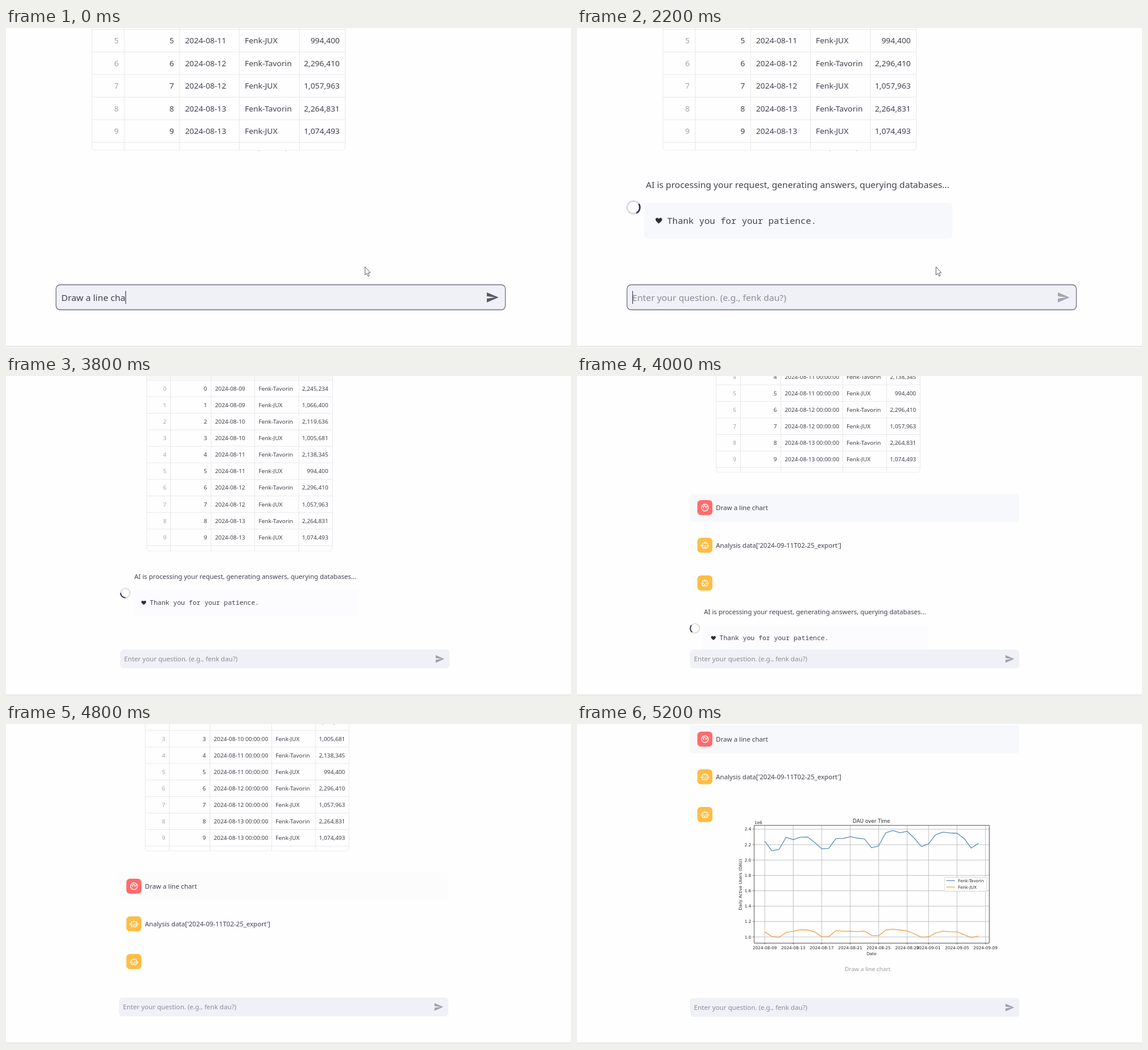
These frames come from a looping animation (960x544 px, 5600 ms). An HTML page with a canvas:

```html
<!DOCTYPE html>
<html lang="en">
<head>
<meta charset="utf-8">
<title>Chat to line chart</title>
<style>
html, body { margin: 0; width: 100%; height: 100%; overflow: hidden; background: #fefefe; }
canvas { display: block; width: 100vw; height: 100vh; }
</style>
</head>
<body>
<canvas id="stage" width="960" height="544"></canvas>
<script>
const ctx = document.getElementById('stage').getContext('2d');
const LOOP = 5600;
const SANS = '"Noto Sans", sans-serif';
const MONO = '"Noto Sans Mono", monospace';
const PLOT = '"DejaVu Sans", sans-serif';
const PAGE = '#fefefe', INK = '#41434e', MUTED = '#8b8d98', GRID = '#e9e9ec';
const BRANDS = ['Fenk-Tavorin', 'Fenk-JUX'];
const PROMPT = 'Draw a line chart';
const HINT = 'Enter your question. (e.g., fenk dau?)';
const VALUES = ['2,245,234', '1,066,400', '2,119,636', '1,005,681', '2,138,345', '994,400',
  '2,296,410', '1,057,963', '2,264,831', '1,074,493', '2,297,118'];
// Daily users in millions
const UPPER = [2.245, 2.12, 2.138, 2.296, 2.265, 2.297, 2.3, 2.23, 2.147, 2.152, 2.28, 2.28, 2.303,
  2.285, 2.275, 2.16, 2.185, 2.355, 2.383, 2.355, 2.373, 2.285, 2.175, 2.21, 2.33, 2.363, 2.352,
  2.348, 2.28, 2.155, 2.217];
const LOWER = [1.066, 1.006, 0.996, 1.058, 1.074, 1.092, 1.09, 1.065, 1.003, 1.003, 1.083, 1.073,
  1.075, 1.07, 1.077, 1.02, 1.017, 1.09, 1.101, 1.09, 1.077, 1.04, 0.995, 1, 1.053, 1.076, 1.068,
  1.066, 1.03, 0.992, 1.01];
const SEND = new Path2D('M2 21L23 12 2 3V10L17 12 2 14z');
const HEART = new Path2D('M0 5C-3 2.5 -5.6 .6 -5.6 -1.9C-5.6 -5 -1.6 -5.8 0 -3C1.6 -5.8 5.6 -5 5.6 -1.9C5.6 .6 3 2.5 0 5z');
const POINTER = new Path2D('M610 406V420L613 417.2 615.3 422 617.3 421 615.2 416.4 619 416z');

// y is the middle of the capitals
function text(str, x, y, size, color = INK, align = 'left', family = SANS) {
  ctx.font = `${size}px ${family}`;
  ctx.fillStyle = color;
  ctx.textAlign = align;
  ctx.fillText(str, x, y + size * 0.36);
}

function line(x1, y1, x2, y2, color, width = 1) {
  ctx.strokeStyle = color;
  ctx.lineWidth = width;
  ctx.beginPath();
  ctx.moveTo(x1, y1);
  ctx.lineTo(x2, y2);
  ctx.stroke();
}

function box(x, y, w, h, r, fill, stroke, width = 1) {
  ctx.beginPath();
  ctx.roundRect(x, y, w, h, r);
  if (fill) { ctx.fillStyle = fill; ctx.fill(); }
  if (stroke) { ctx.strokeStyle = stroke; ctx.lineWidth = width; ctx.stroke(); }
}

function shape(path, x, y, scale, color) {
  ctx.save();
  ctx.translate(x, y);
  ctx.scale(scale, scale);
  ctx.fillStyle = color;
  ctx.fill(path);
  ctx.restore();
}

function ring(x, y, r, from, to, color, width) {
  ctx.strokeStyle = color;
  ctx.lineWidth = width;
  ctx.beginPath();
  ctx.arc(x, y, r, from, to);
  ctx.stroke();
}

function dot(x, y, r, color) {
  ctx.fillStyle = color;
  ctx.beginPath();
  ctx.arc(x, y, r, 0, 7);
  ctx.fill();
}

function send(x, y, scale, color) {
  shape(SEND, x - 12.5 * scale, y - 12 * scale, scale, color);
}

function table({ cols, first, step, bottom, size, pad, clock = '' }) {
  const [left, , , , , right] = cols;
  const top = first - step / 2;
  ctx.save();
  ctx.beginPath();
  ctx.rect(left - 1, -600, right - left + 2, bottom + 600);
  ctx.clip();
  box(left, top - step, right - left, step, 0, '#f9f9fb');
  box(left, top - step, right - left, bottom - top + step - 0.5, [0, 0, 6, 6], null, GRID);
  cols.slice(1, 5).forEach(x => line(x, top - step, x, bottom, GRID));
  VALUES.forEach((value, i) => {
    const y = first + i * step;
    const day = 9 + (i >> 1);
    line(left, y - step / 2, right, y - step / 2, GRID);
    text(i, cols[1] - pad, y, size, '#a3a4ac', 'right');
    text(i, cols[2] - pad, y, size, INK, 'right');
    text(`2024-08-${String(day).padStart(2, '0')}${clock}`, cols[2] + pad - 0.3, y, size);
    text(BRANDS[i % 2], cols[3] + pad - 0.3, y, size);
    text(value, right - pad, y, size, INK, 'right');
  });
  ctx.restore();
}

function spinner(x, y, r, degrees) {
  const mid = degrees * Math.PI / 180;
  const width = r * 0.24;
  ring(x, y, r, 0, Math.PI * 2, '#d9d9dd', width);
  ring(x, y, r, mid - 0.85, mid + 0.85, '#35365a', width);
}

// x, y: start of the first text line
function waiting(x, y, scale, fill, degrees) {
  box(x - 3 * scale, y + 30 * scale, 524 * scale, 61 * scale, 7 * scale, fill);
  text('AI is processing your request, generating answers, querying databases...', x, y, 15.15 * scale);
  shape(HEART, x + 22 * scale, y + 60.5 * scale, scale, '#2c2d36');
  text('Thank you for your patience.', x + 36 * scale, y + 60.5 * scale, 15.12 * scale, INK, 'left', MONO);
  spinner(x - 21 * scale, y + 38 * scale, 10.8 * scale, degrees);
}

function smallInput(x, y) {
  ctx.fillStyle = PAGE;
  ctx.fillRect(0, y, 960, 544 - y);
  box(x, y, 559.5, 32, 6, '#f0f1f6');
  text(HINT, x + 6.8, y + 16.3, 11.2, MUTED);
  send(x + 543.5, y + 16, 0.71, '#a0a2ab');
}

function bottomLine(y) {
  line(0, y, 960, y, '#e4e4e6', 2);
}

function typingScene(t) {
  table({ cols: [146, 201, 295, 396.5, 498.5, 576.5], first: -170.5, step: 38.4, bottom: 208.5, size: 13.4, pad: 9.5 });
  if (t >= 2200) waiting(117, 267, 1, '#f7f8fb', 15);
  box(85, 436.5, 763.5, 42.5, 7, '#f0f0f7', '#737482', 1.3);
  const typed = t < 200 ? PROMPT.slice(0, -2) : t < 1800 ? PROMPT : '';
  text(typed || HINT, 94, 458.5, 15.2, typed ? INK : MUTED);
  const caretOn = t < 1000 || (t >= 1400 && t < 1800) || t >= 2200;
  if (caretOn) {
    const x = 94.5 + ctx.measureText(typed).width;
    line(x, 447, x, 469, '#3c3d48', 1.1);
  }
  send(827, 458, 0.95, typed ? '#565864' : '#a3a5b2');
  ctx.fillStyle = '#fff';
  ctx.fill(POINTER);
  ctx.strokeStyle = '#5c5c60';
  ctx.lineWidth = 1;
  ctx.stroke(POINTER);
  bottomLine(541.5);
}

function processingScene(t) {
  const turns = Math.max(0, Math.floor((t - 3000) / 200));
  table({ cols: [239, 279.5, 348.5, 422.5, 497.5, 554.5], first: 21.3, step: 28.1, bottom: 298.5, size: 9.8, pad: 7 });
  waiting(218, 341.2, 0.7315, '#fcfcfe', t < 3200 ? 12 : -250 + 96 * turns);
  smallInput(194, 465);
  bottomLine(542.5);
}

function avatar(y, isUser) {
  const x = 217.3;
  box(x - 12.8, y - 12.8, 25.6, 25.6, 6, isUser ? '#ff6c6c' : '#ffbd45');
  if (isUser) {
    ring(x, y, 5.8, 0, 7, '#fff', 1.3);
    ring(x + 2.5, y - 6.5, 5, 0.75, 2.2, '#fff', 1.2);
    ring(x - 5, y - 6, 5, 0.3, 1.4, '#fff', 1.2);
  } else {
    box(x - 4.6, y - 3.6, 9.2, 8.6, 2.2, null, '#fff', 1.3);
    line(x, y - 6.2, x, y - 3.6, '#fff', 1.3);
    line(x - 6.4, y - 0.5, x - 6.4, y + 2.3, '#fff', 1.3);
    line(x + 6.4, y - 0.5, x + 6.4, y + 2.3, '#fff', 1.3);
    line(x - 2, y + 2.8, x + 2, y + 2.8, '#fff', 1.1);
  }
  dot(x - 2.1, y + 0.6, 0.9, '#fff');
  dot(x + 2.1, y + 0.6, 0.9, '#fff');
}

function chart() {
  const px = day => 319 + day * 12.1;
  const py = value => 362 - (value - 1) * 130.75;
  const label = (str, x, y, align = 'center', size = 7.05) => text(str, x, y, size, '#2b2b2b', align, PLOT);
  const days = [0, 4, 8, 12, 16, 20, 23, 27, 31];
  days.forEach(day => {
    const x = px(day);
    const date = new Date(Date.UTC(2024, 7, 9 + day)).toISOString().slice(0, 10);
    line(x, 172, x, 372.5, '#bdbdbd', 0.9);
    line(x, 372.5, x, 375, '#333', 0.7);
    label(date, x, 380.3);
  });
  for (let i = 0; i < 8; i++) {
    const value = 1 + i / 5, y = py(value);
    line(301, y, 700.5, y, '#bdbdbd', 0.9);
    line(298.5, y, 301, y, '#333', 0.7);
    label(value.toFixed(1), 296, y, 'right');
  }
  const plot = (series, color) => {
    ctx.strokeStyle = color;
    ctx.lineWidth = 1.3;
    ctx.lineJoin = 'round';
    ctx.beginPath();
    series.forEach((value, i) => ctx.lineTo(px(i), py(value)));
    ctx.stroke();
  };
  const colors = ['#5b92bf', '#eda24f'];
  plot(UPPER, colors[0]);
  plot(LOWER, colors[1]);
  box(301, 172.3, 399.5, 200.2, 0, null, '#444', 0.9);
  box(624.5, 260.5, 72, 24, 1.5, 'rgba(255,255,255,.85)', '#d2d2d2', 0.8);
  BRANDS.forEach((name, i) => {
    const y = 266.3 + i * 10.9;
    line(627.5, y, 642, y, colors[i], 1.3);
    label(name, 647.5, y, 'left');
  });
  label('DAU over Time', 500.3, 165, 'center', 8.5);
  label('1e6', 301.5, 167.3, 'left');
  label('Date', 500.3, 390.5);
  ctx.save();
  ctx.translate(277.5, 273);
  ctx.rotate(-Math.PI / 2);
  label('Daily Active Users (DAU)', 0, 0);
  ctx.restore();
  text(PROMPT, 494, 416.3, 9.8, '#9b9ca4', 'center');
}

function answerScene(t) {
  const shift = t < 4200 ? 28 : t < 4800 ? 0 : t < 5000 ? 80 : t < 5200 ? -146 : -170;
  const settled = t >= 4800 && t < 5000;
  ctx.save();
  ctx.translate(0, shift);
  table({ cols: [236.5, 277.5, 346.5, 451.5, 526, 583], first: -139.3, step: 28.1, bottom: 136.5, size: 9.8, pad: 6.8, clock: ' 00:00:00' });
  box(192, 172, 559, 48, 5, settled ? '#fcfcfd' : '#f7f8fb');
  avatar(195.7, true);
  text(PROMPT, 236, 196, 11.15);
  avatar(259.7, false);
  text("Analysis data['2024-09-11T02-25_export']", 236, 260.2, 11.1);
  avatar(323.9, false);
  if (t < 4800) {
    const turn = Math.floor((t - 4200) / 200);
    waiting(215.7, 373.2, 0.7315, '#fcfcfe', -90 + 96 * turn);
  }
  if (t >= 5000) {
    ctx.translate(0, 170);
    chart();
  }
  ctx.restore();
  smallInput(192, t < 5000 ? 465 : 466);
  bottomLine(542.5);
}

function draw(now) {
  const t = now % LOOP;
  ctx.fillStyle = PAGE;
  ctx.fillRect(0, 0, 960, 544);
  if (t < 2800) typingScene(t);
  else if (t < 4000) processingScene(t);
  else answerScene(t);
}

const start = performance.now();
function tick() {
  draw(performance.now() - start);
  requestAnimationFrame(tick);
}
tick();
</script>
</body>
</html>
```
